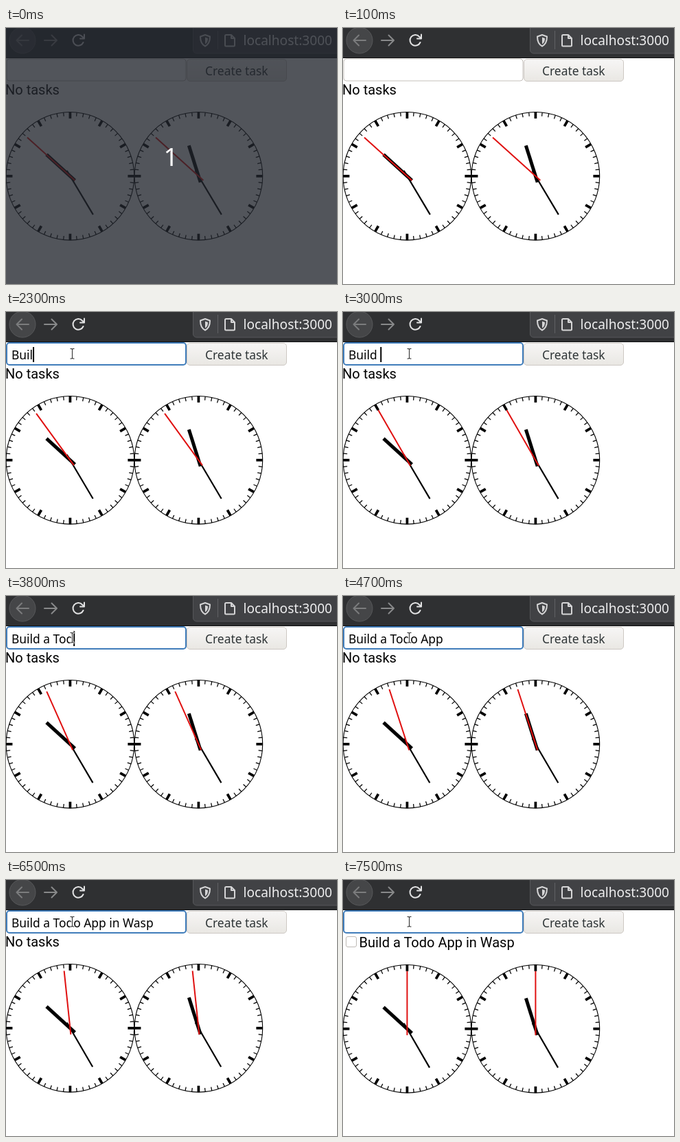
Write an HTML page that moves like this. It is 482 by 373 pixels and loops after 8000 ms.

```html
<!DOCTYPE html>
<html lang="en">
<head>
<meta charset="utf-8">
<title>Todo app with clocks</title>
<style>
  html, body { margin: 0; width: 100%; height: 100%; overflow: hidden; background: #fff; }
  svg { display: block; width: 482px; height: 373px; }
  text { white-space: pre; }
  .ui { font: 17.4px "Noto Sans", "Open Sans", sans-serif; }
  .page { font: 20px Roboto, sans-serif; }
  .icon { fill: none; stroke-width: 2; stroke-linecap: round; stroke-linejoin: round; }
</style>
</head>
<body>
<svg viewBox="0 0 482 373">
  <defs>
    <linearGradient id="face" x2="0" y2="1">
      <stop stop-color="#f7f6f5"/><stop offset="1" stop-color="#e9e7e3"/>
    </linearGradient>
    <path id="ibeam" d="M93.500 53.500H95.500L96.500 54.500L97.500 53.500H99.500M96.500 54.500V67M93.500 68H95.500L96.500 67L97.500 68H99.500"/>
  </defs>

  <!-- browser toolbar -->
  <rect width="482" height="43" fill="#2f3032"/>
  <rect y="43" width="482" height="1" fill="#0d0d0e"/>
  <circle cx="24" cy="18" r="19" fill="#454648" stroke="#58595b"/>
  <path class="icon" stroke="#7b7c7d" d="M33 18H15.500M23 10.500L15.500 18L23 25.500"/>
  <path class="icon" stroke="#88898a" d="M56 18H74M66.500 10.500L74 18L66.500 25.500"/>
  <path class="icon" stroke="#e2e2e3" d="M112.500 21A7.800 7.800 0 1 1 111 12.500L113.500 15M114 9.500V15.500H108"/>
  <rect x="272.500" y="-5" width="230" height="42" rx="5" fill="#414245" stroke="#56575a"/>
  <path class="icon" stroke="#d5d5d6" d="M290 10L297 12.500C297 19 295 24 290 26.500C285 24 283 19 283 12.500Z"/>
  <path fill="#d5d5d6" d="M290 13.500L294 15C294 19 293 21.500 290 23.500Z"/>
  <path stroke="#606164" d="M308.500 4V31"/>
  <path class="icon" stroke="#d5d5d6" d="M328 10H320.500Q319 10 319 11.500V25Q319 26.500 320.500 26.500H331.500Q333 26.500 333 25V15ZM328 10V15H333"/>
  <text class="ui" x="345.500" y="25" style="font-size:19.1px" fill="#eeeeef">localhost:3000</text>

  <!-- form -->
  <rect id="field" x="1" y="45" width="261" height="32" rx="4" fill="#fff"/>
  <text id="typed" class="ui" x="8" y="69"></text>
  <rect id="caret" y="51" width="2" height="22"/>
  <rect x="263.500" y="45.500" width="145" height="32" rx="4.500" fill="url(#face)" stroke="#cdc8c3"/>
  <text class="ui" x="290" y="69" fill="#2e3436">Create task</text>

  <!-- task list -->
  <text id="empty" class="page" x="-1" y="97">No tasks</text>
  <g id="task">
    <rect x="4.500" y="82.500" width="15" height="15" rx="2.500" fill="#fff" stroke="#bdb9b5"/>
    <text class="page" x="23.500" y="98">Build a Todo App in Wasp</text>
  </g>

  <g id="clocks"></g>

  <path id="arrow" d="M0 0V18L4.500 14L7.500 21L10.500 19.500L7.500 13H13Z" stroke="#fff"/>
  <g id="beam" fill="none">
    <use href="#ibeam" stroke="#fff" stroke-width="3.2"/>
    <use href="#ibeam" stroke="#333" stroke-width="1.1"/>
  </g>

  <g id="intro">
    <rect width="482" height="373" fill="#22262e" fill-opacity=".78"/>
    <text class="ui" x="240" y="201" style="font-size:37px" fill="#fff" text-anchor="middle">1</text>
  </g>
</svg>
<script>
const LOOP = 8000, STEP = 100;
const ENTER = 400, REACH = 1000, FOCUS = 1100, SUBMIT = 6900;
const KEY_GAP = 130, CARET_HOLD = 200;
const RADIUS = 93.3;
const $ = id => document.getElementById(id);
const show = (id, on) => $(id).setAttribute('visibility', on ? 'visible' : 'hidden');

// Each word is typed at an even pace from its own start time.
const words = { 'Build': 1900, ' a': 3000, ' Todo': 3400, ' App': 4100, ' in': 4900, ' Wasp': 5200 };
const message = Object.keys(words).join('');
const keys = Object.entries(words).flatMap(([word, start]) =>
  [...word].map((_, i) => start + i * KEY_GAP));

const line = (from, to, width, angle, color = '#000') =>
  `<path d="M0 ${-from}V${-to}" stroke="${color}" stroke-width="${width}" transform="rotate(${angle})"/>`;

let marks = `<circle r="${RADIUS}" fill="#fff" stroke="#000" stroke-width="1.1"/>`;
for (let i = 0; i < 60; i++) {
  const hour = i % 5 == 0;
  marks += line(RADIUS * (hour ? .9 : .94), RADIUS, hour ? 3.75 : 1.25, i * 6);
}
$('clocks').innerHTML = [93.4, 280.4].map(x =>
  `<g transform="translate(${x} 215.8)">${marks}<g class="hands"></g></g>`).join('');
const hands = document.querySelectorAll('.hands');

function drawClocks(seconds) {
  const hand = (length, width, angle, color) =>
    line(-RADIUS * .1, RADIUS * length, width, angle, color);
  const minutes = 24 + seconds / 60;
  hands.forEach((g, i) => {
    g.innerHTML = hand(.5, 5, (10 + i + minutes / 60) * 30) +
      hand(.7, 2.2, minutes * 6) +
      hand(.9, 2, seconds * 6, '#e01010');
  });
}

function drawPointer(t) {
  const p = (t - ENTER) / (REACH - ENTER);
  const left = (1 - p) ** 1.5;
  show('arrow', p >= 0 && p < 1);
  show('beam', p >= 1);
  if (p >= 0 && p < 1)
    $('arrow').setAttribute('transform', `translate(${96 + 136 * left} ${60 + 230 * left})`);
}

function drawForm(t) {
  const focused = t >= FOCUS;
  const pressed = keys.filter(k => k <= t);
  const lastKey = pressed.at(-1) ?? FOCUS;
  $('field').setAttribute('stroke', focused ? '#3f7cba' : '#c4c0bb');
  $('field').setAttribute('stroke-width', focused ? 2 : 1);
  $('typed').textContent = t < SUBMIT ? message.slice(0, pressed.length) : '';
  $('caret').setAttribute('x', 8 + $('typed').getComputedTextLength());
  show('caret', focused && t - lastKey < CARET_HOLD);
}

function draw(t) {
  const added = t >= SUBMIT;
  show('intro', t < STEP);
  show('empty', !added);
  show('task', added);
  drawForm(t);
  drawPointer(t);
  $('clocks').setAttribute('transform', `translate(0 ${added ? 1 : 0})`);
  drawClocks(53 + Math.floor((t - 390) / 1014));
}

const start = performance.now();
function frame() {
  const t = (performance.now() - start) % LOOP;
  draw(t - t % STEP);
  requestAnimationFrame(frame);
}
frame();
</script>
</body>
</html>
```
